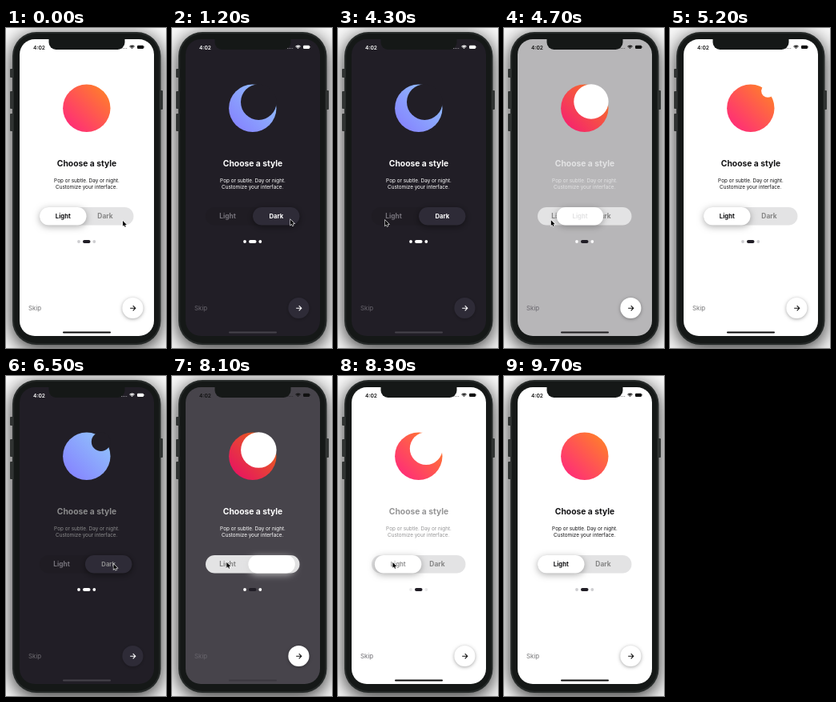
These frames come from a looping animation (200x400 px, 9.9 s). An HTML page with a canvas:

```html
<!DOCTYPE html>
<html lang="en">
<head>
<meta charset="utf-8">
<title>Theme switch</title>
<style>
html, body { margin: 0; width: 100%; height: 100%; overflow: hidden; background: #ddd; }
canvas { display: block; }
</style>
</head>
<body>
<canvas id="stage" width="200" height="400"></canvas>
<script>
const ctx = document.getElementById('stage').getContext('2d');
const LOOP = 9900, STEP = 100, FROZEN_UNTIL = 1200;

const WHITE = [255, 255, 255], BLACK = [18, 18, 20];
const DARK_BG = [33, 30, 38], DARK_RAISED = [46, 43, 55];

// Taps on the switch: [time, dark?]
const taps = [[-5000, 0], [200, 1], [4565, 0], [6247, 1], [8066, 0]];

// Pointer trips: [time, x, y]
const trips = [
  [[0, 146, 241], [1199, 146, 241], [1200, 148, 239.5], [1300, 172, 226], [1400, 201, 210]],
  [[4100, 30, 247], [4200, 47, 243], [4300, 58.8, 240.3], [4700, 58.8, 240.3], [5000, 8, 300]],
  [[6100, 137, 288], [6250, 134.4, 235], [6900, 134.4, 235], [7200, 73, 235], [7400, 68.4, 233],
   [9400, 68.4, 233], [9500, 72, 250], [9600, 96, 335], [9650, 112, 400]]
];

const clamp = v => Math.max(0, Math.min(1, v));
const lerp = (a, b, p) => a + (b - a) * p;
const mix = (a, b, p) => a.map((v, i) => lerp(v, b[i], p));
const rgb = (c, alpha = 1) => `rgba(${c.map(Math.round)},${alpha})`;
const ease = p => 1 - (1 - p ** 1.5) ** 3;

function box(x, y, w, h, r, fill) {
  ctx.fillStyle = fill;
  ctx.beginPath();
  ctx.roundRect(x, y, w, h, r);
  ctx.fill();
}

function disc(x, y, r, fill) {
  ctx.fillStyle = fill;
  ctx.beginPath();
  ctx.arc(x, y, r, 0, 7);
  ctx.fill();
}

function text(str, x, y, size, weight, fill, align = 'center') {
  ctx.font = `${weight} ${size}px Inter, sans-serif`;
  ctx.textAlign = align;
  ctx.fillStyle = fill;
  ctx.fillText(str, x, y);
}

function withShadow(color, blur, dy, draw) {
  ctx.save();
  ctx.shadowColor = color;
  ctx.shadowBlur = blur;
  ctx.shadowOffsetY = dy;
  draw();
  ctx.restore();
}

function drawPhone() {
  ctx.fillStyle = '#fafafa';
  ctx.fillRect(0, 0, 200, 400);
  withShadow('rgba(0,0,0,.85)', 24, 5, () => box(8, 5, 185.5, 391, 30, '#262a29'));
  for (const [x, y, h] of [[5, 51, 11], [5, 79, 22], [5, 107, 22], [192, 78, 24]])
    box(x, y, 4, h, 1, '#303332');
  box(10, 7, 181.5, 387, 28, '#151817');
}

function drawStatus(color) {
  box(53.5, 10, 95, 17, [0, 0, 9, 9], '#151817');
  text('4:02', 34, 26.5, 6.6, 600, color, 'left');
  for (let i = 0; i < 4; i++) disc(144.5 + i * 2.1, 25.5, .45, color);
  ctx.strokeStyle = color;
  ctx.lineWidth = 1.1;
  for (const r of [.7, 2.4, 4.1]) {
    ctx.beginPath();
    ctx.arc(157.5, 26.2, r, -Math.PI * .76, -Math.PI * .24);
    ctx.stroke();
  }
  box(164, 21.7, 8, 4.2, 1.2, color);
  box(172.4, 23, .7, 1.6, .3, color);
}

function drawSun(dark, biteScale, biteColor) {
  const fill = ctx.createLinearGradient(71, 130, 131, 70);
  fill.addColorStop(0, dark ? '#847bff' : 'rgba(255,0,112,.87)');
  fill.addColorStop(1, dark ? '#92cbfb' : 'rgba(255,120,0,.87)');
  disc(100.8, 100.2, 29.7, fill);
  const r = 22.3 * biteScale;
  if (r > .05) disc(130.6 - r, 70.3 + r, r, biteColor);
}

function drawSwitch(dark, slide, fade, raised, ink) {
  const x = lerp(42, 101, slide), gray = dark ? '#76737b' : '#868686';
  box(42, 224, 117.5, 22.6, 11.3, dark ? '#1f1c23' : '#e3e3e4');
  text('Light', 69.5, 238.2, 8.4, 700, gray);
  text('Dark', 124, 238.2, 8.4, 700, gray);
  const v = 255 * (1 - fade);
  const shadow = dark ? 'rgba(0,0,0,.45)' : rgb([v, v, v], lerp(.85, .32, fade));
  withShadow(shadow, 9, 2, () => box(x, 224, 58.5, 22.5, 11.25, raised));
  text(dark ? 'Dark' : 'Light', x + 29.3, 238.2, 7.7, 700, ink);
}

function drawNext(dark, raised, color) {
  withShadow(dark ? 'rgba(0,0,0,.25)' : 'rgba(0,0,0,.35)', 4, 1, () => disc(158.4, 350, 13.1, raised));
  ctx.strokeStyle = color;
  ctx.lineWidth = 1.1;
  ctx.beginPath();
  ctx.moveTo(155.2, 350.2);
  ctx.lineTo(161.7, 350.2);
  ctx.moveTo(158.7, 347.1);
  ctx.lineTo(161.8, 350.2);
  ctx.lineTo(158.7, 353.3);
  ctx.stroke();
}

function drawPointer(t) {
  const trip = trips.find(p => t >= p[0][0] && t < p[p.length - 1][0]);
  if (!trip) return;
  const i = trip.findIndex(k => k[0] > t), a = trip[i - 1], b = trip[i];
  const p = (t - a[0]) / (b[0] - a[0]);
  ctx.save();
  ctx.translate(lerp(a[1], b[1], p), lerp(a[2], b[2], p));
  ctx.scale(.82, .82);
  const arrow = new Path2D('M0 0V8.2L1.9 6.5L3.2 9.4L4.6 8.8L3.3 6H6Z');
  ctx.strokeStyle = '#fff';
  ctx.lineWidth = 1.3;
  ctx.stroke(arrow);
  ctx.fillStyle = '#000';
  ctx.fill(arrow);
  ctx.restore();
}

function render(t) {
  const clock = t < FROZEN_UNTIL ? 0 : t;
  const [start, dark] = taps.filter(tap => tap[0] <= clock).pop();
  const age = clock - start;
  const toward = (light, night, p) => dark ? mix(light, night, p) : mix(night, light, p);
  const level = p => dark ? p : 1 - p;

  const fade = clamp(age / 200);
  const inkFade = clamp((age - 100) / 300);
  const slide = level(ease(clamp(age / 330)));
  const bite = 1 - (1 - level(clamp(age / 800))) ** 2;

  const ink = rgb(toward(BLACK, WHITE, inkFade));
  const raised = rgb(dark ? DARK_RAISED : WHITE);
  const solid = dark ? '#fff' : '#111';

  drawPhone();
  box(17, 14, 168, 371, 19, rgb(toward(WHITE, DARK_BG, fade)));
  drawStatus(solid);
  drawSun(dark, bite, rgb(dark ? DARK_BG : WHITE));

  text('Choose a style', 101, 173, 10.3, 700, ink);
  text('Pop or subtle. Day or night.', 101, 193, 6.37, 400, ink);
  text('Customize your interface.', 100.7, 201, 6.37, 400, ink);
  drawSwitch(dark, slide, fade, raised, ink);

  const dot = rgb(dark ? WHITE : mix(WHITE, [205, 205, 208], inkFade));
  disc(91, 267, 1.9, dot);
  disc(110.3, 267, 1.9, dot);
  box(96, 265, 9.5, 4, 2, rgb(dark ? WHITE : DARK_BG));

  text('Skip', 28, 353, 7.9, 400, rgb(toward([118, 118, 120], [104, 101, 109], inkFade)), 'left');
  drawNext(dark, raised, solid);
  box(71, 379.5, 60, 2, 1, rgb(toward([10, 10, 10], [70, 67, 75], fade)));
  drawPointer(t);
}

function tick(now) {
  render(Math.floor(now % LOOP / STEP) * STEP);
  requestAnimationFrame(tick);
}
requestAnimationFrame(tick);
</script>
</body>
</html>
```
